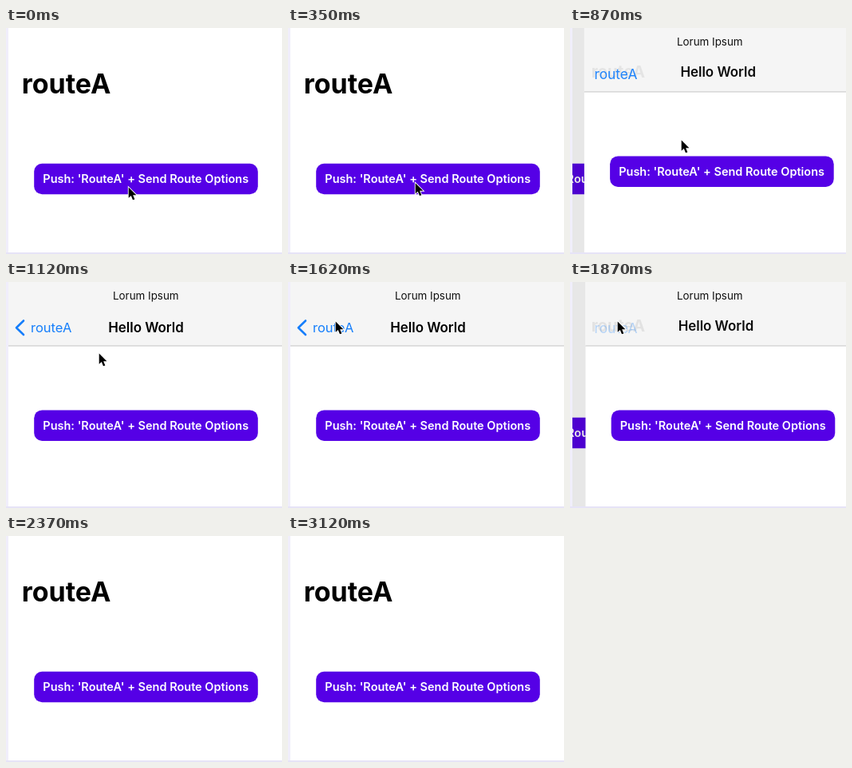
Write an HTML page with a canvas that moves like this. It is 346 by 283 pixels and loops after 3240 ms.

```html
<!DOCTYPE html>
<html lang="en">
<meta charset="utf-8">
<title>Route options</title>
<style>
  html, body { margin: 0; width: 100%; height: 100%; overflow: hidden; background: #fff; }
  canvas { display: block; }
</style>
<canvas width="346" height="283"></canvas>
<script>
const ctx = document.querySelector('canvas').getContext('2d');
const LOOP = 3240, STEP = 125, LEFT = 3, WIDTH = 344;
const BLUE = '#157efb', PURPLE = '#5500e6';
const PUSH_AT = 536, POP_AT = 1850;

// step, x, y of the pointer
const pointerPath = [[0, 153, 199], [3, 162, 191], [5, 162, 191], [9, 116, 89], [11, 59, 49], [17, 59, 49]];
const pressOpacity = { 3: .65, 4: .4, 5: .5, 6: .85 };

const clamp = v => Math.max(0, Math.min(1, v));
const mix = (a, b, p) => a + (b - a) * p;

// Critically damped spring that settles within half a second
function spring(ms) {
  const s = Math.max(0, ms) * .0138;
  return Math.min(1, 1.01 * (1 - (1 + s) * Math.exp(-s)));
}

function rect(x, y, w, h, color) {
  ctx.fillStyle = color;
  ctx.fillRect(x, y, w, h);
}

function text(str, x, y, size, weight, color, alpha = 1, align = 'left') {
  ctx.save();
  ctx.globalAlpha = clamp(alpha);
  ctx.font = `${weight} ${size}px Inter, "Liberation Sans", sans-serif`;
  ctx.textAlign = align;
  ctx.fillStyle = color;
  ctx.fillText(str, x, y);
  ctx.restore();
}

function button(dx, y, opacity = 1) {
  ctx.save();
  ctx.globalAlpha = opacity;
  ctx.fillStyle = PURPLE;
  ctx.beginPath();
  ctx.roundRect(35.2 + dx, y, 280.6, 38.5, 10);
  ctx.fill();
  ctx.restore();
  text("Push: 'RouteA' + Send Route Options", 175.2 + dx, y + 24.4, 14.5, 600, '#fff', 1, 'center');
}

function pages(p, opacity) {
  ctx.save();
  ctx.beginPath();
  ctx.rect(LEFT, 0, WIDTH, 281);
  ctx.clip();
  button(-.3 * WIDTH * p, 169.8, opacity);
  rect(LEFT, 0, WIDTH, 281, `rgba(0,0,0,${.1 * p})`);
  if (p > 0) {
    const dx = WIDTH * (1 - p);
    rect(LEFT + dx, 0, WIDTH, 281, '#fff');
    rect(LEFT + dx, 0, WIDTH, 80, '#f5f5f5');
    rect(LEFT + dx, 79.5, WIDTH, 1, `rgba(0,0,0,${.22 * p})`);
    button(dx, 160.4);
  }
  ctx.restore();
}

function header(p, popping) {
  const q = 1 - p;
  // The large title lifts and shrinks while the back label fades in below it
  const lift = 40 * p * q;
  text('routeA', mix(19.7, 27, p), mix(82, 63, p) - lift, 34 * mix(1, .585, p), 700, '#000', 1 - p ** 1.6);
  if (p === 0) return;
  text('routeA', mix(18, 31, p), mix(82.5, 63, p), mix(36.5, 16.5, p), 400, BLUE, popping ? 1 - 15 * q : p);
  text('Hello World', 175.5 + (popping ? 155 : 236) * q, 63 - 39 * q, 16.9, 600, '#000', p, 'center');
  text('Lorum Ipsum', 175.3, 21.5, 13.4, 400, '#111', (p - .6) * 3, 'center');

  ctx.save();
  ctx.globalAlpha = clamp((p - .96) * 25);
  ctx.strokeStyle = BLUE;
  ctx.lineWidth = 2.6;
  ctx.lineCap = ctx.lineJoin = 'round';
  ctx.beginPath();
  ctx.moveTo(22, 48.5);
  ctx.lineTo(13, 57.3);
  ctx.lineTo(22, 66);
  ctx.stroke();
  ctx.restore();
}

function pointer(step) {
  const i = pointerPath.findIndex(key => key[0] > step);
  if (i < 0) return;
  const [k0, x0, y0] = pointerPath[i - 1], [k1, x1, y1] = pointerPath[i];
  const p = (step - k0) / (k1 - k0);
  ctx.save();
  ctx.translate(mix(x0, x1, p) + .7, mix(y0, y1, p) + .5);
  ctx.scale(.88, .88);
  const arrow = new Path2D('M0 0V15L3.5 12L6 18L8.7 17L6.2 11H11Z');
  ctx.strokeStyle = '#fff';
  ctx.lineWidth = 2;
  ctx.stroke(arrow);
  ctx.fillStyle = '#000';
  ctx.fill(arrow);
  ctx.restore();
}

function draw(now) {
  const step = Math.floor((now % LOOP + 5) / STEP);
  const t = step * STEP;
  const popping = t >= POP_AT;
  const p = popping ? 1 - spring(t - POP_AT) : spring(t - PUSH_AT);
  rect(0, 0, 346, 283, '#fff');
  pages(p, pressOpacity[step]);
  rect(0, 0, LEFT, 283, '#f0eefb');
  rect(0, 281, 346, 2, '#e6e3f7');
  header(p, popping);
  pointer(step);
  requestAnimationFrame(draw);
}
requestAnimationFrame(draw);
</script>
</html>
```
